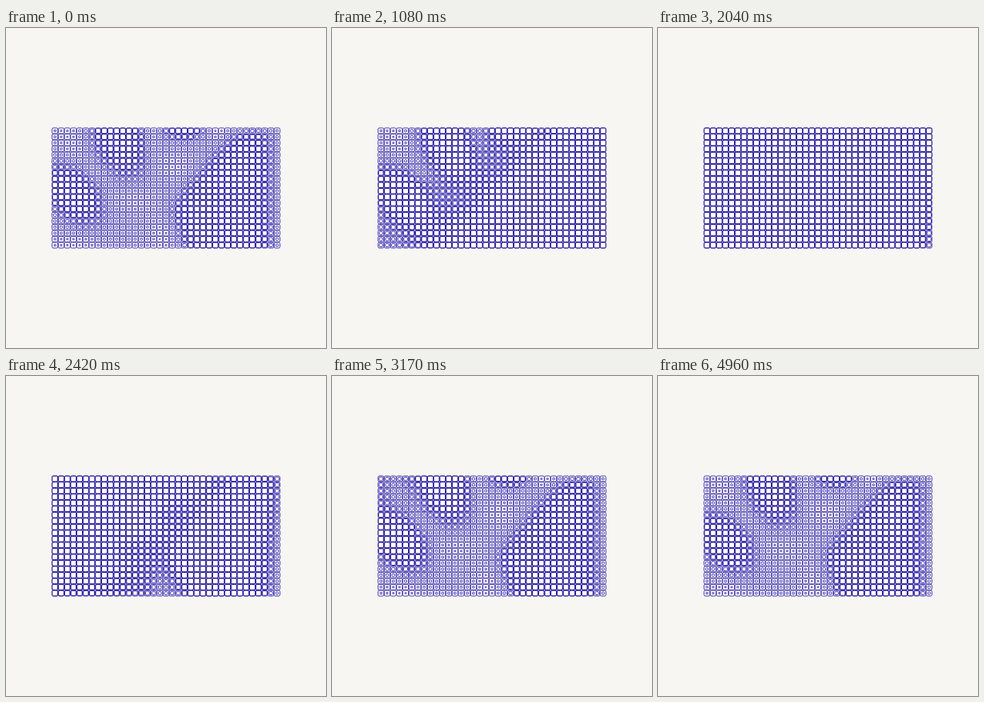
These frames come from a looping animation (400 px wide and 400 px high, 5000 ms). An HTML page:

```html
<!DOCTYPE html>
<html lang="en">
<head>
<meta charset="utf-8">
<title>Cell wave</title>
<style>
  html, body { margin: 0; width: 100%; height: 100%; overflow: hidden; background: #f7f6f2; }
  svg { display: block; width: 100vw; height: 100vh; }
  path { stroke: #1a0ca0; stroke-width: .8; }
  #outer { fill: #fff; }
  #inner { fill: none; }
</style>
</head>
<body>
<svg viewBox="0 0 400 400">
  <path id="outer"/>
  <path id="inner"/>
</svg>
<script>
const LOOP = 5000, COLS = 37, ROWS = 20;
const PITCH_X = 7.71, PITCH_Y = 7.52, CELL = 7.2, CORNER = 1.6;
const RISE = 800, FALL_START = 1300, FALL = 1150, SPREAD = 1200, GAIN = 0.85;

// Soft shapes: centre x, centre y, radius x, radius y, horizontal shear
const blobs = [[140, 136, 25, 39, 0.25], [84, 208, 26, 29, 0.4], [222, 120, 20, 15, 0]];
const dips = [
  [81, 143, 16, 24, 0.3], [181, 138, 10, 22, 0], [155, 214, 32, 16, 0],
  [113, 181, 14, 12, 0.8], [205, 172, 22, 16, 0], [194, 260, 12, 20, 0],
  [88, 268, 28, 10, 0], [264, 130, 12, 9, 0]
];

const clamp = v => Math.min(1, Math.max(0, v));
const ease = v => (1 - Math.cos(Math.PI * clamp(v))) / 2;
const sigmoid = v => 1 / (1 + Math.exp(-v));
const radius = (x, y, [cx, cy, rx, ry, shear]) =>
  Math.hypot((x - cx - shear * (y - cy)) / rx, (y - cy) / ry);

function restSize(x, y) {
  let floor = 0.36;
  for (const d of dips) floor -= 0.17 * Math.exp(-(radius(x, y, d) ** 2));
  floor = Math.max(floor, 0.16);

  const edges = [
    328 - x,
    y - 131,
    0.75 * x + 0.66 * y - 302.5,
    x - 0.4 * (y - 232) - 209.5
  ];
  const field = edges.reduce((product, d) => product * sigmoid(d / 5), 1);
  const band = 0.1 * Math.exp(-(((y - 211) / 10) ** 2));
  let gap = 1 - field * (1 - band);
  for (const b of blobs) gap *= 1 - 1 / (1 + 0.4 * radius(x, y, b) ** 5);
  return floor + (0.95 - floor) * (1 - gap);
}

function roundedSquare(x, y, scale) {
  const size = CELL * scale, r = CORNER * scale, side = size - 2 * r;
  const n = v => v.toFixed(2);
  const arc = (dx, dy) => `a${n(r)} ${n(r)} 0 0 1 ${n(dx * r)} ${n(dy * r)}`;
  return `M${n(x - side / 2)} ${n(y - size / 2)}h${n(side)}${arc(1, 1)}v${n(side)}` +
    `${arc(-1, 1)}h${n(-side)}${arc(-1, -1)}v${n(-side)}${arc(1, -1)}z`;
}

const cells = [];
for (let row = 0; row < ROWS; row++) {
  for (let col = 0; col < COLS; col++) {
    const x = 200 + (col - (COLS - 1) / 2) * PITCH_X;
    const y = 200 + (row - (ROWS - 1) / 2) * PITCH_Y;
    // The wave crosses diagonally from the bottom right corner
    const steps = COLS - 1 - col + ROWS - 1 - row;
    const delay = SPREAD * steps / (COLS + ROWS - 2);
    cells.push({ x, y, delay, rest: restSize(x, y) });
  }
}

const inner = document.getElementById('inner');
document.getElementById('outer')
  .setAttribute('d', cells.map(c => roundedSquare(c.x, c.y, 1)).join(''));

function draw(time) {
  inner.setAttribute('d', cells.map(({ x, y, delay, rest }) => {
    const t = time - delay;
    const wave = ease(t / RISE) - ease((t - FALL_START) / FALL);
    return roundedSquare(x, y, Math.min(1, rest + GAIN * wave));
  }).join(''));
}

const start = performance.now();
function tick() {
  draw((performance.now() - start) % LOOP);
  requestAnimationFrame(tick);
}
draw(0);
requestAnimationFrame(tick);
</script>
</body>
</html>
```
